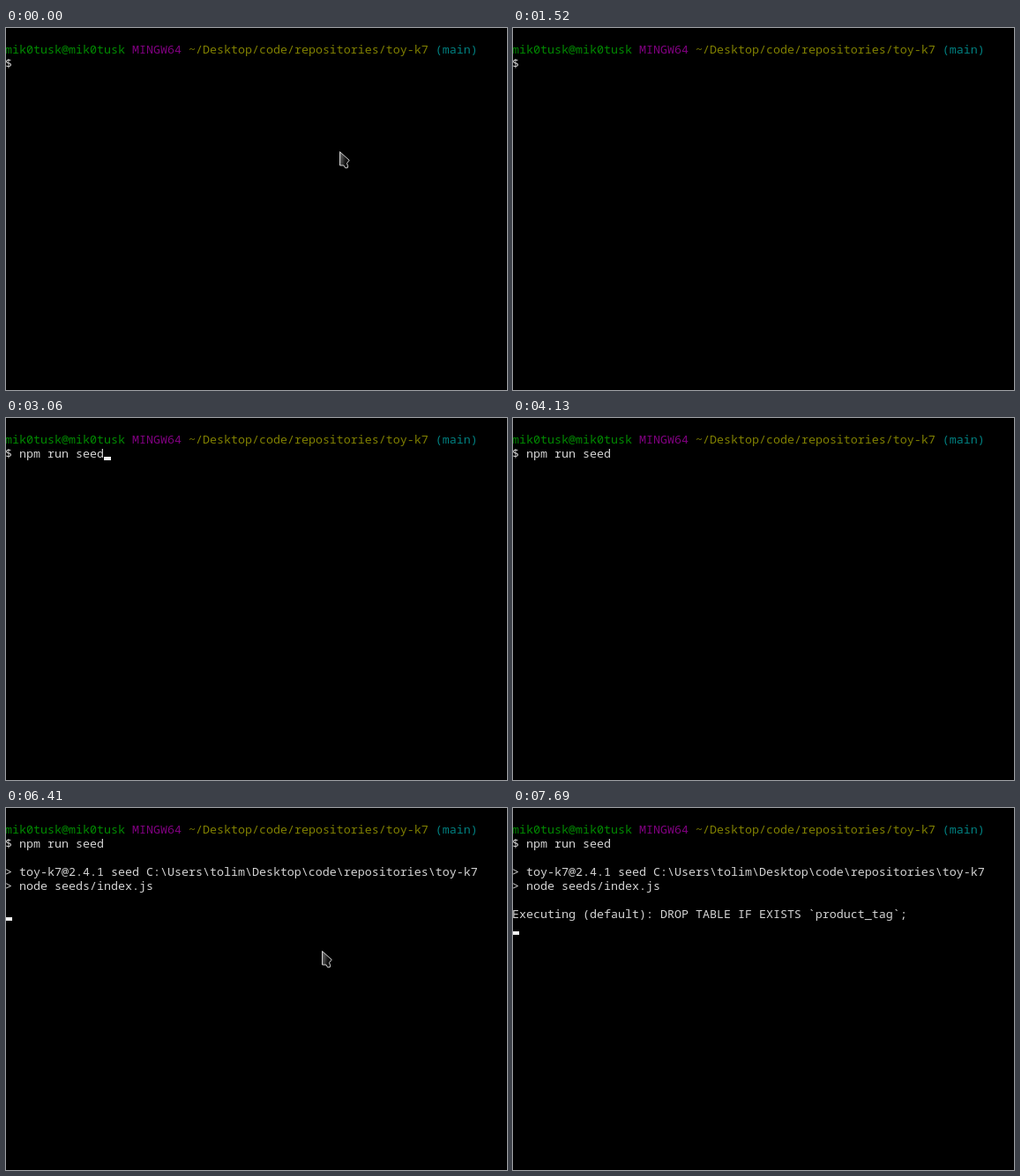
Write an HTML page that moves like this. It is 568 by 411 pixels and loops after 8000 ms.

```html
<!DOCTYPE html>
<html lang="en">
<head>
<meta charset="utf-8">
<title>Terminal session</title>
<style>
  html, body { margin: 0; width: 100%; height: 100%; overflow: hidden; background: #000; }
  pre {
    position: absolute; left: -1px; top: 16px; margin: 0;
    font: 13.3333px/16px "Noto Sans Mono", monospace; color: #d4d4d4;
  }
  .user { color: #008a00; }
  .system { color: #800080; }
  .path { color: #808000; }
  .branch { color: #008080; }
  #caret { position: absolute; width: 8px; height: 4px; background: #f0f0f0; }
  #pointer { position: absolute; left: 0; top: 0; }
</style>
</head>
<body>
<pre><span class="user">mik0tusk@mik0tusk</span> <span class="system">MINGW64</span> <span class="path">~/Desktop/code/repositories/toy-k7</span> <span class="branch">(main)</span>
$ <span id="command"></span>
<span id="output"></span></pre>
<div id="caret"></div>
<svg id="pointer" width="13" height="20">
  <defs>
    <linearGradient id="shade" x2="1" y2="0.3">
      <stop offset="0" stop-color="#777"/>
      <stop offset="0.7" stop-color="#111"/>
    </linearGradient>
  </defs>
  <path d="M.5 .5V16H5L6.5 18.8H9.2L9.7 16.8L8.5 13.6L11.2 10.2Z" fill="url(#shade)" stroke="#d0d0d0"/>
</svg>
<script>
const DURATION = 8000;
const COMMAND = "npm run seed";
const keyTimes = [1650, 1720, 1850, 2040, 2170, 2240, 2310, 2510, 2580, 2850, 2920, 3060];

const output = [
  [6410, "\n> toy-k7@2.4.1 seed C:\\Users\\tolim\\Desktop\\code\\repositories\\toy-k7\n> node seeds/index.js\n\n"],
  [7690, "Executing (default): DROP TABLE IF EXISTS `product_tag`;\n"]
];

// Caret states: time, visible, row (row 1 is the command line).
const caretStates = [
  [0, false, 1], [990, true, 1], [1520, false, 1], [1650, true, 1], [4130, false, 1],
  [4960, true, 2], [5550, false, 2], [6080, true, 2],
  [6410, true, 6], [7160, false, 6], [7690, true, 7]
];

// Pointer states: time, then position; no position means hidden.
const sweep = Array.from({ length: 9 }, (_, i) => {
  const p = i / 8;
  return [i ? 70 + (i - 1) * 64.2 : 0, Math.round(378 - 267 * p), Math.round(140 - 52 * p)];
});
const pointerStates = [
  ...sweep, [580, 88, 77], [660],
  [3390, 198, 295], [3460, 291, 353], [3530],
  [4340, 350, 184], [4410, 346, 166], [4480, 354, 154], [4560, 358, 162],
  [6480, 352, 155], [6550, 340, 146], [6620]
];

const byId = id => document.getElementById(id);
const [commandEl, outputEl, caretEl, pointerEl] = ["command", "output", "caret", "pointer"].map(byId);
const stateAt = (states, t) => states.findLast(([start]) => start <= t);
const place = (el, x, y) => { el.style.transform = `translate(${x}px, ${y}px)`; };
const show = (el, visible) => { el.style.visibility = visible ? "visible" : "hidden"; };

function render(t) {
  const typed = keyTimes.filter(time => time <= t).length;
  commandEl.textContent = COMMAND.slice(0, typed);
  outputEl.textContent = output.filter(([time]) => time <= t).map(([, text]) => text).join("");

  const [, caretOn, row] = stateAt(caretStates, t);
  const column = row === 1 ? 2 + typed : 0;
  show(caretEl, caretOn);
  place(caretEl, column * 8 - 1, row * 16 + 28);

  const [, x, y] = stateAt(pointerStates, t);
  show(pointerEl, x !== undefined);
  if (x !== undefined) place(pointerEl, x, y);
}

const start = performance.now();
function tick() {
  render((performance.now() - start) % DURATION);
  requestAnimationFrame(tick);
}
tick();
</script>
</body>
</html>
```
